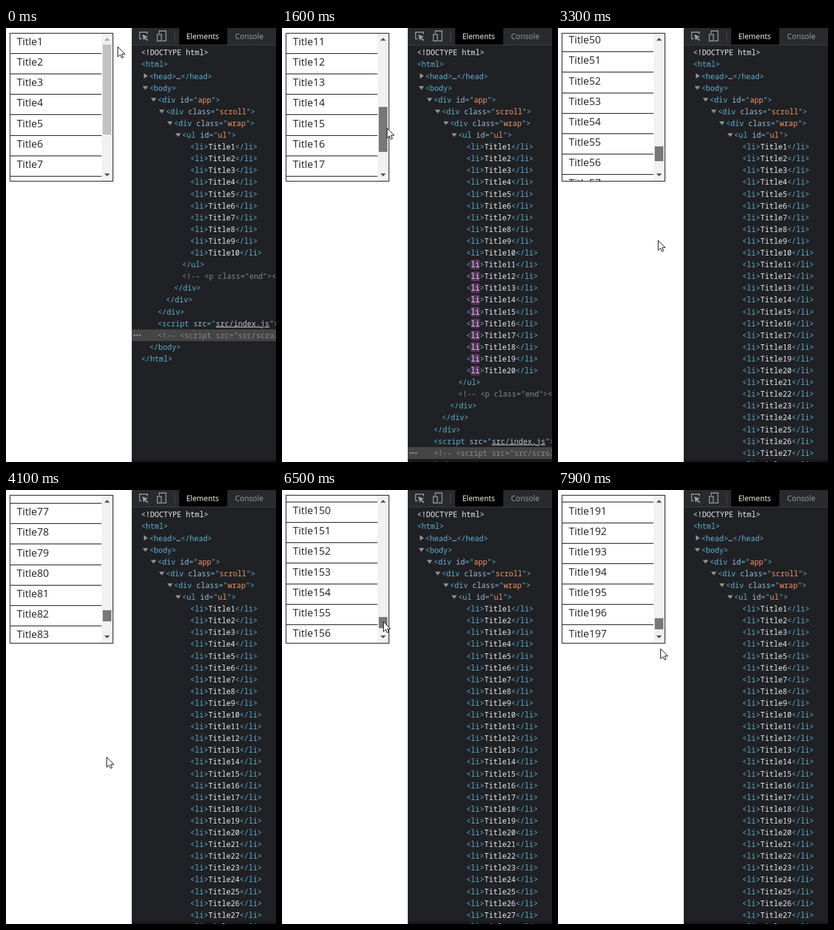
An HTML page for the animation above (8000 ms loop, 438 by 704 pixels).

```html
<!DOCTYPE html>
<html lang="en">
<head>
<meta charset="utf-8">
<title>Endless list</title>
<style>
  html, body { margin: 0; width: 438px; height: 704px; overflow: hidden; background: #fff; }
  svg { display: block; }
  text { white-space: pre; }
  #rows text { font: 16.7px "Open Sans", "Noto Sans", sans-serif; fill: #212121; }
  .tab { font: 12.3px "Open Sans", "Noto Sans", sans-serif; fill: #9aa0a6; }
  .code text { font: 12.1px "Noto Sans Mono", "DejaVu Sans Mono", monospace; fill: #5db0d7; }
  .code .n { fill: #9bbbdc; }
  .code .v { fill: #f29766; }
  .code .t { fill: #e8eaed; }
  .code .c { fill: #898989; }
  .code .l { fill: #bdc1c6; text-decoration: underline; }
  .icon { fill: none; stroke: #9aa0a6; stroke-width: 1.4; }
  .tri { fill: #919191; }
</style>
</head>
<body>
<svg width="438" height="704" viewBox="0 0 438 704">
  <rect width="438" height="704" fill="#fff"/>

  <svg x="7" y="9" width="148" height="239" viewBox="7 9 148 239" id="rows"></svg>
  <rect x="155" y="9" width="18" height="239" fill="#f1f1f1"/>
  <path id="up" d="M159.5 20.5h9l-4.5-4.5z"/>
  <path d="M159.5 236h9l-4.5 4.5z" fill="#505050"/>
  <rect id="thumb" x="157" width="14"/>
  <rect x="6.5" y="8.5" width="167" height="240" fill="none" stroke="#000"/>

  <rect x="204" width="234" height="704" fill="#202124"/>
  <rect x="204" y="700" width="234" height="4" fill="#19181d"/>
  <g class="code" id="code"></g>

  <rect x="204" width="234" height="27" fill="#292a2d"/>
  <rect x="204" y="27" width="234" height="1" fill="#3c4043"/>
  <rect x="281" width="78" height="27" fill="#000"/>
  <rect x="273" y="5" width="1" height="17" fill="#494c50"/>
  <path class="icon" d="M220 17.5h-3.3v-10.8h12.6v3.3"/>
  <path d="M221 10.5l9.5 3.5-4 1.5 4 4-1.5 1.5-4-4-1.5 4z" fill="#9aa0a6"/>
  <path class="icon" d="M248.5 9v-4.3h11v16.3h-6M245.5 10.5h6.5v10.5h-6.5z"/>
  <text class="tab" x="292.5" y="18" style="fill:#fff">Elements</text>
  <text class="tab" x="371.5" y="18">Console</text>

  <path id="cursor" d="M.5 .5V16.8L4.3 13.2L6.7 18.5L9.2 17.4L6.9 12.2H12z" fill="#fff" stroke="#000"/>
</svg>
<script>
const LOOP = 8000, STEP = 100, FLASH = 1400;
const ROW = 33.15, PAGE = 10, VIEW = 239, PRELOAD = 36;
const TRACK = 202.8, TRACK_TOP = 27, MIN_THUMB = 18;
const LINE = 19.1, INDENT = 13.3, CODE_X = 219.3, CHAR = 7.26, SHOWN = 28;

const $ = id => document.getElementById(id);
const lineY = i => 40 + i * LINE;
const span = (cls, s) => `<tspan class="${cls}">${s}</tspan>`;
const open = s => '&lt;' + s + '&gt;';
const close = s => open('/' + s);
const attr = (name, val) => ` ${span('n', name)}="${span('v', val)}"`;
const note = s => span('c', `&lt;!-- ${s} --&gt;`);

function set(el, attrs) {
  for (const k in attrs) el.setAttribute(k, attrs[k]);
}

function add(parent, name, attrs, html = '') {
  const el = document.createElementNS('http://www.w3.org/2000/svg', name);
  set(el, attrs);
  el.innerHTML = html;
  return parent.appendChild(el);
}

function codeLine(parent, row, level, html, arrow) {
  const x = CODE_X + level * INDENT, y = lineY(row);
  if (arrow) {
    const d = arrow === 'open' ? `M${x - 11} ${y - 3}h9l-4.5 6z` : `M${x - 9} ${y - 5}v9l6.5 -4.5z`;
    add(parent, 'path', { class: 'tri', d });
  }
  return add(parent, 'text', { x, y: y + 4.3 }, html);
}

const mix = (a, b, f) => a.map((v, i) => v + (b[i] - v) * f);
const rgb = c => `rgb(${c.map(Math.round)})`;

// Linear motion through [time, ...values] stops
function along(stops, t) {
  const i = stops.findIndex(p => p[0] > t);
  if (i < 1) return stops.at(i).slice(1);
  const [a, b] = [stops[i - 1], stops[i]];
  return mix(a, b, (t - a[0]) / (b[0] - a[0])).slice(1);
}

const scrollPath = [
  [1000, 0], [1600, 331.5], [2600, 857.9], [4100, 2506.1],
  [5400, 4700.9], [6100, 4700.9], [6500, 4928.2], [7900, 6286.85]
];
const cursorPath = [
  [300, 181, 30], [700, 157, 61], [1000, 157, 61], [1600, 170, 162], [2600, 162, 267], [4100, 163, 433],
  [5200, 174, 540], [5500, 174, 215], [6000, 164, 205], [6500, 164, 213], [7900, 166, 257]
];
const scrollAt = t => along(scrollPath, t)[0];
const isPressed = t => t >= 900 && t < 5300 || t >= 5900;

// A new page is appended whenever the end comes near
const countAt = t => PAGE * Math.ceil((scrollAt(t) + VIEW + PRELOAD) / (PAGE * ROW));

function bornAt(i) {
  let t = 0;
  while (countAt(t) <= i) t += STEP;
  return t || -LOOP;
}

// Panel markup
const code = $('code');
codeLine(code, 0, 0, span('t', '&lt;!DOCTYPE html&gt;'));
codeLine(code, 1, 0, open('html'));
codeLine(code, 2, 1, open('head') + span('t', '…') + close('head'), 'closed');
codeLine(code, 3, 1, open('body'), 'open');
[['div', 'id', 'app'], ['div', 'class', 'scroll'], ['div', 'class', 'wrap'], ['ul', 'id', 'ul']].forEach(
  ([tag, name, val], i) => codeLine(code, 4 + i, 2 + i, open(tag + attr(name, val)), 'open'));

const items = Array.from({ length: SHOWN }, (_, i) => {
  const g = add(code, 'g', {});
  const box = add(g, 'rect', {
    x: CODE_X + 6 * INDENT + CHAR, y: lineY(8 + i) - 8, width: 2 * CHAR, height: 16, rx: 2
  });
  const text = codeLine(g, 8 + i, 6,
    `&lt;<tspan>li</tspan>&gt;${span('t', 'Title' + (i + 1))}${close('li')}`);
  return { g, box, tag: text.firstElementChild, born: bornAt(i) };
});

const tail = add(code, 'g', {});
add(tail, 'rect', { x: 204, y: lineY(14) - 9.5, width: 234, height: 19, fill: '#454545' });
for (let i = 0; i < 3; i++) add(tail, 'circle', { cx: 208.5 + 4.5 * i, cy: lineY(14), r: 1.3, fill: '#9aa0a6' });
[
  [5, close('ul')], [5, note('&lt;p class="end"&gt;&lt;/p&gt;')],
  [4, close('div')], [3, close('div')], [2, close('div')],
  [2, `&lt;script ${span('n', 'src')}="${span('l', 'src/index.js')}"&gt;${close('script')}`],
  [2, note('&lt;script src="src/scroll.js"&gt;&lt;/script&gt;')],
  [1, close('body')], [0, close('html')]
].forEach(([level, html], i) => codeLine(tail, 8 + i, level, html));

// List rows, reused while scrolling
const rows = Array.from({ length: 9 }, () => {
  const g = add($('rows'), 'g', {});
  add(g, 'rect', { x: 7, y: 41, width: 148, height: 1, fill: '#000' });
  return { g, text: add(g, 'text', { x: 17.5, y: 28 }) };
});

function drawList(s) {
  const first = Math.floor(s / ROW + .01) - 1;
  rows.forEach(({ g, text }, i) => {
    const n = first + i;
    set(g, { transform: `translate(0 ${Math.round(n * ROW - s)})` });
    text.textContent = n < 0 ? '' : 'Title' + (n + 1);
  });
}

function drawBar(t, s, height, x, y) {
  const size = Math.max(MIN_THUMB, VIEW / height * TRACK);
  const top = Math.floor(TRACK_TOP + s / (height - VIEW) * (TRACK - size));
  const hover = x >= 157 && x <= 172 && y >= top && y <= top + size;
  const fill = isPressed(t) ? '#787878' : hover ? '#a8a8a8' : '#c1c1c1';
  set($('thumb'), { y: top, height: Math.round(size), fill });
  set($('up'), { fill: s > 0 ? '#505050' : '#a3a3a3' });
}

function drawPanel(t, count) {
  items.forEach(({ g, box, tag, born }, i) => {
    const age = Math.min(1, (t - born) / FLASH);
    g.style.display = i < count ? '' : 'none';
    box.style.fill = rgb(mix([112, 53, 112], [32, 33, 36], age));
    tag.style.fill = rgb(mix([255, 255, 255], [93, 176, 215], age));
  });
  set(tail, { transform: `translate(0 ${count * LINE})` });
}

function draw(t) {
  const s = scrollAt(t), count = countAt(t);
  const [x, y] = along(cursorPath, t).map(Math.round);
  drawList(s);
  drawBar(t, s, count * ROW, x, y);
  drawPanel(t, count);
  set($('cursor'), { transform: `translate(${x} ${y})` });
}

function tick() {
  draw(Math.floor(performance.now() % LOOP / STEP) * STEP);
  requestAnimationFrame(tick);
}
tick();
</script>
</body>
</html>
```
